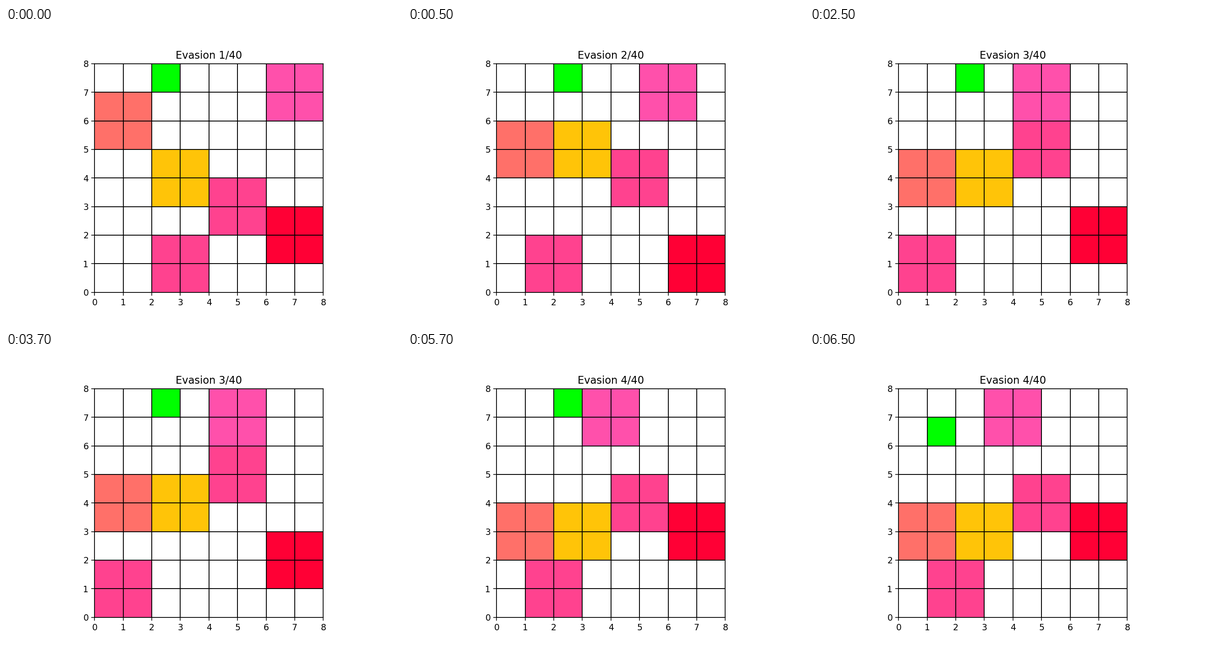
Recreate the animation shown at these times as a matplotlib script. Size 864 by 648 pixels, loop 8 s.

```python
import matplotlib.pyplot as plt
from matplotlib.animation import FuncAnimation
from matplotlib.patches import Rectangle

plt.rcParams["font.family"] = "DejaVu Sans"

SIZE = 8
INTERVAL = 500
FRAMES = 16

# Each block: colour, start cell, and its unit move at every step.
UP, DOWN, LEFT, RIGHT = (0, 1), (0, -1), (-1, 0), (1, 0)
BLOCKS = [
    ("#ff7069", (0, 5), (DOWN, DOWN, DOWN)),
    ("#ffc408", (2, 3), (UP, DOWN, DOWN)),
    ("#ff428f", (4, 2), (UP, UP, DOWN)),
    ("#ff50ab", (6, 6), (LEFT, LEFT, LEFT)),
    ("#ff428f", (2, 0), (LEFT, LEFT, RIGHT)),
    ("#ff0035", (6, 1), (DOWN, UP, UP)),
]

fig, ax = plt.subplots(figsize=(6.4, 4.8), dpi=135)
ax.set(xlim=(0, SIZE), ylim=(0, SIZE), aspect="equal",
       xticks=range(SIZE + 1), yticks=range(SIZE + 1))
ax.grid(color="black", linewidth=1)
title = ax.set_title("")


def add_square(cell, side, color):
    return ax.add_patch(Rectangle(cell, side, side, facecolor=color, linewidth=0))


squares = [add_square(start, 2, color) for color, start, _ in BLOCKS]
runner = add_square((2, 7), 1, "#00ff00")


def update(frame):
    time = frame * INTERVAL
    # Blocks move every 2 s from 0.5 s on; the runner answers at 6.5 s.
    step = min((time + 1500) // 2000, 3)
    for square, (_, (x, y), moves) in zip(squares, BLOCKS):
        done = moves[:step]
        square.set_xy((x + sum(dx for dx, _ in done),
                       y + sum(dy for _, dy in done)))
    runner.set_xy((1, 6) if time >= 6500 else (2, 7))
    title.set_text(f"Evasion {step + 1}/40")
    return [*squares, runner, title]


anim = FuncAnimation(fig, update, frames=FRAMES, interval=INTERVAL,
                     repeat=True, repeat_delay=0)
plt.show()
```
